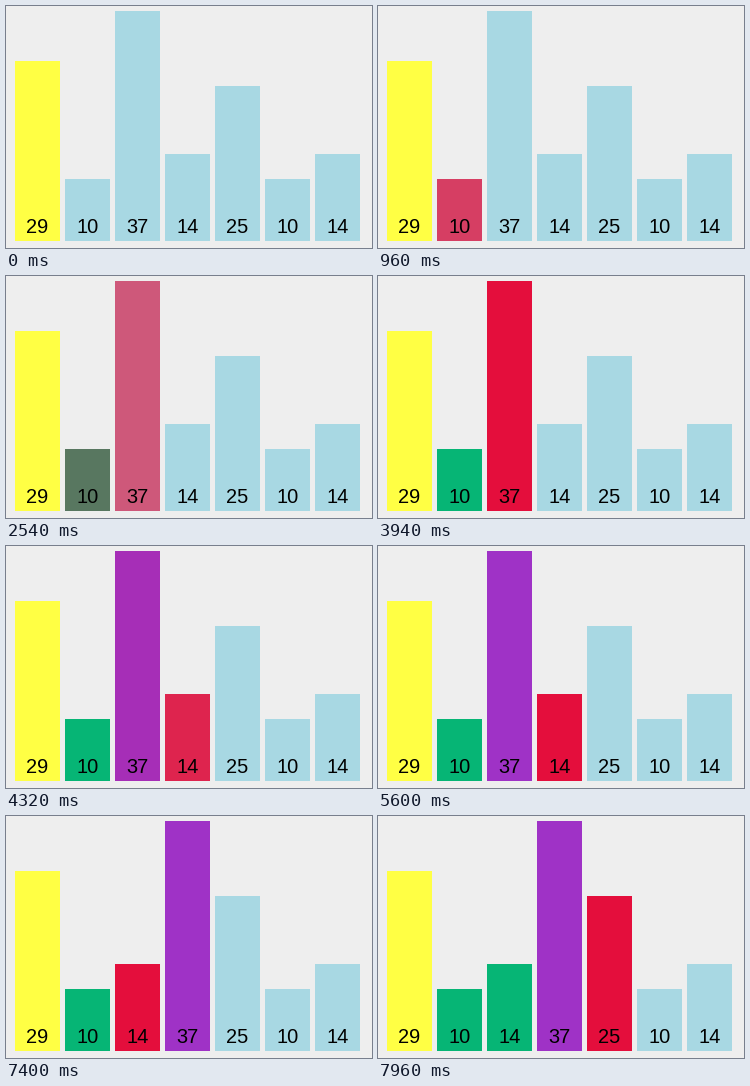
These frames come from a looping animation (366 px wide and 242 px high, 8 s). A matplotlib script:

```python
import numpy as np
import matplotlib.pyplot as plt
from matplotlib.animation import FuncAnimation
from matplotlib.patches import Rectangle

W, H, DPI = 366, 242, 100
STEP, LOOP = 20, 8000
BASE, TALLEST = 235, 230
LEFT, PITCH, BAR_W = 9, 50, 45

VALUES = [29, 10, 37, 14, 25, 10, 14]


def rgb(r, g, b):
    return np.array([r, g, b]) / 255


YELLOW = rgb(255, 255, 68)
BLUE = rgb(168, 216, 227)
RED = rgb(228, 14, 60)
GREEN = rgb(6, 181, 117)
PURPLE = rgb(159, 50, 198)

# (start ms, end ms, {bar: new colour}, {bar: new slot})
EVENTS = [
    (520, 1240, {1: RED}, {}),
    (2200, 2820, {1: GREEN, 2: RED}, {}),
    (3900, 4500, {2: PURPLE, 3: RED}, {}),
    (5560, 6300, {}, {2: 3, 3: 2}),
    (7360, 7960, {3: GREEN, 4: RED}, {}),
]


def ease(t, start, end):
    """Cubic in-out progress between two times."""
    u = min(max((t - start) / (end - start), 0), 1)
    return 4 * u**3 if u < 0.5 else 1 - 4 * (1 - u)**3


def state(t):
    colors = [YELLOW] + [BLUE] * (len(VALUES) - 1)
    slots = [float(i) for i in range(len(VALUES))]
    for start, end, paint, move in EVENTS:
        p = ease(t, start, end)
        for i, c in paint.items():
            colors[i] = colors[i] + (c - colors[i]) * p
        for i, s in move.items():
            slots[i] += (s - slots[i]) * p
    return colors, slots


fig = plt.figure(figsize=(W / DPI, H / DPI), dpi=DPI, facecolor="#eeeeee")
ax = fig.add_axes([0, 0, 1, 1])
ax.set_xlim(0, W)
ax.set_ylim(H, 0)
ax.axis("off")

bars, labels = [], []
for i, v in enumerate(VALUES):
    h = TALLEST * v / max(VALUES)
    bar = Rectangle((0, BASE - h), BAR_W, h, linewidth=0, zorder=2 * i + 1)
    bars.append(ax.add_patch(bar))
    labels.append(ax.text(0, 227, str(v), ha="center", va="baseline",
                          family="Liberation Sans", fontsize=20 * 72 / DPI,
                          color="black", zorder=2 * i + 2))


def draw(frame):
    colors, slots = state(frame * STEP)
    for bar, label, color, slot in zip(bars, labels, colors, slots):
        x = LEFT + PITCH * slot
        bar.set_x(x)
        bar.set_facecolor(color)
        label.set_x(x + BAR_W / 2)
    return bars + labels


anim = FuncAnimation(fig, draw, init_func=lambda: draw(0),
                     frames=LOOP // STEP, interval=STEP, repeat=True)
plt.show()
```
